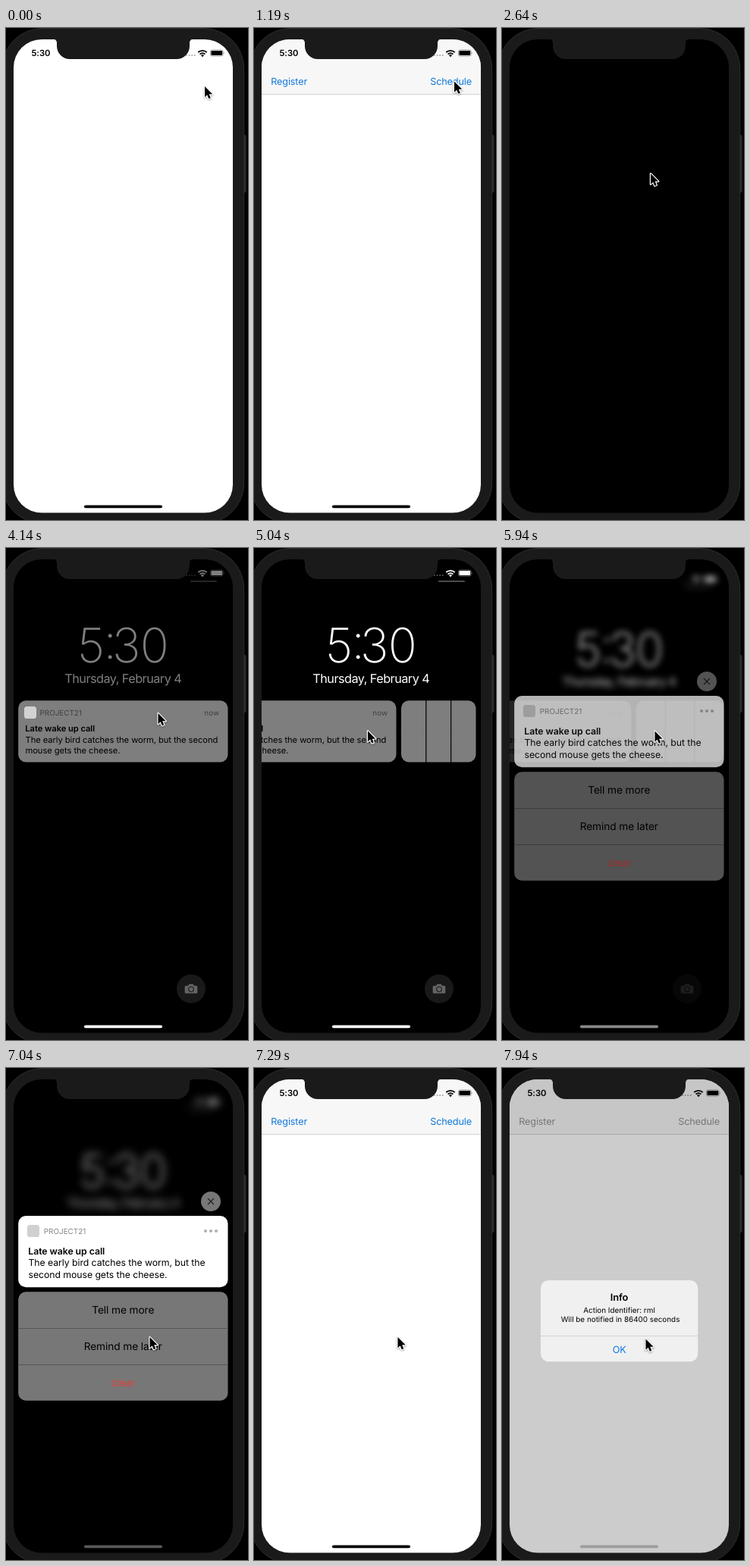
Recreate the animation shown at these times as an HTML page. Size 319 by 649 pixels, loop 7990 ms.

```html
<!DOCTYPE html>
<html lang="en">
<head>
<meta charset="utf-8">
<title>Notification actions</title>
<style>
  html, body { margin: 0; width: 100%; height: 100%; overflow: hidden; background: #000; }
  svg { display: block; width: 319px; height: 649px; }
  text { font-family: Inter, "Liberation Sans", sans-serif; letter-spacing: -.006em; text-rendering: geometricPrecision; }
  .mid { text-anchor: middle; }
  .end { text-anchor: end; }
  .bold { font-weight: 600; }
  .nav { font-size: 12.7px; letter-spacing: -.012em; }
  .small { font-size: 9.9px; letter-spacing: 0; }
  .short { font-size: 11.2px; }
  .long { font-size: 12.3px; }
  .row { font-size: 13.7px; }
  .cell { font-size: 11px; fill: #454545; }
  .clock { font-size: 63px; font-weight: 200; font-feature-settings: "calt" 0; }
  .date { font-size: 16.3px; letter-spacing: -.034em; }
  #cursor { filter: drop-shadow(0 1px 1px rgba(0, 0, 0, .35)); }
  #wall { transform-origin: 154px 324px; }
  #alert { transform-origin: 154.5px 334px; }
</style>
</head>
<body>
<svg viewBox="0 0 319 649">
  <defs>
    <clipPath id="screen"><rect x="10" y="15" width="289" height="624.5" rx="37"/></clipPath>
    <g id="icons">
      <path d="M253.3 32.2A8 8 0 0 1 264.7 32.2M255.6 34.6A4.8 4.8 0 0 1 262.4 34.6" fill="none" stroke="currentColor" stroke-width="1.8"/>
      <path d="M259 38.2L257 36A2.8 2.8 0 0 1 261 36Z" fill="currentColor"/>
      <rect x="269.4" y="28.9" width="16.8" height="8.2" rx="2.4" fill="none" stroke="currentColor" stroke-width=".8" opacity=".45"/>
      <rect x="270.4" y="29.9" width="14.8" height="6.2" rx="1.4" fill="currentColor"/>
      <path d="M287.2 31.5q1.3 1.5 0 3z" fill="currentColor" opacity=".5"/>
      <g fill="currentColor" opacity=".34">
        <circle cx="238" cy="36" r="1"/><circle cx="241.6" cy="36" r="1"/>
        <circle cx="245.2" cy="36" r="1"/><circle cx="248.8" cy="36" r="1"/>
      </g>
    </g>
  </defs>

  <rect x="312" y="141" width="4.6" height="76" rx="1.5" fill="#2b2b2b"/>
  <rect x="-5" y=".5" width="318.7" height="653" rx="53" fill="#1a1a1a" stroke="#2d2d2d"/>

  <g clip-path="url(#screen)">
    <rect x="9" y="14" width="291" height="627"/>

    <g id="lock">
      <g id="wall" fill="#fff" color="#fff">
        <use href="#icons"/>
        <rect x="243" y="43" width="35" height="1.8" rx=".9" opacity=".34"/>
        <text class="clock mid" x="112 137 158.5 195.5" y="151 145.5 151 151">5:30</text>
        <text class="date mid" x="154.3" y="177.6">Thursday, February 4</text>
      </g>
      <g id="camera">
        <circle cx="244" cy="581.5" r="19" fill="#191919"/>
        <path d="M237 577.5h3l1.5-2.3h5l1.5 2.3h3q1.3 0 1.3 1.3v7.4q0 1.3-1.3 1.3h-14q-1.3 0-1.3-1.3v-7.4q0-1.3 1.3-1.3z" fill="#646464"/>
        <circle cx="244" cy="582" r="3.3" fill="#646464" stroke="#191919" stroke-width="1.1"/>
      </g>

      <g id="brief">
        <g id="card">
          <rect x="16.2" y="201.2" width="276.3" height="81.3" rx="10" fill="#7e7e7e"/>
          <rect x="24" y="209" width="16" height="16" rx="3.6" fill="#d2d2d2"/>
          <text class="small" x="44.5" y="220.6" fill="#414141">PROJECT21</text>
          <text class="small end" x="281" y="220.6" fill="#414141">now</text>
          <text class="short bold" x="25.3" y="242">Late wake up call</text>
          <text class="short" x="25.5" y="256.7">The early bird catches the worm, but the second</text>
          <text class="short" x="25.5" y="270.7">mouse gets the cheese.</text>
        </g>
        <g id="swipe">
          <rect id="strip" y="201.2" height="81.3" rx="10" fill="#7e7e7e"/>
          <path id="seams" stroke="#000" stroke-width="1.2"/>
          <text class="cell mid" y="246.3">Manage</text>
          <text class="cell mid" y="246.3">View</text>
          <text class="cell mid" y="246.3">Clear</text>
        </g>
      </g>

      <g id="detail">
        <circle cx="270" cy="176" r="13" fill="#777"/>
        <path d="M266 172l8 8m0-8l-8 8" stroke="#222" stroke-width="1.2"/>
        <rect x="16.2" y="195" width="276.3" height="94.2" rx="10" fill="#fff"/>
        <rect x="28" y="207" width="16" height="16" rx="3.6" fill="#d0d0d0"/>
        <text class="small" x="49.8" y="218.7" fill="#858585">PROJECT21</text>
        <g fill="#b0b0b0">
          <circle cx="263" cy="215" r="2.1"/><circle cx="270" cy="215" r="2.1"/><circle cx="277" cy="215" r="2.1"/>
        </g>
        <text class="long bold" x="29.3" y="245.6">Late wake up call</text>
        <text class="long" x="29.5" y="261.3">The early bird catches the worm, but the</text>
        <text class="long" x="29.5" y="276.5">second mouse gets the cheese.</text>
        <rect x="16.2" y="295.2" width="276.3" height="143.5" rx="10" fill="#777"/>
        <path d="M16.2 343.5h276.3m0 48h-276.3" stroke="#555"/>
        <text class="row mid" x="154.3" y="324.3">Tell me more</text>
        <text class="row mid" x="154.3" y="372">Remind me later</text>
        <text class="row mid" x="154.3" y="420" fill="#e2403a">clear</text>
      </g>
    </g>

    <g id="app">
      <rect x="9" y="14" width="291" height="627" fill="#fff"/>
      <g id="bar">
        <rect x="9" y="14" width="291" height="73" fill="#f7f7f7"/>
        <path d="M9 87.5h291" stroke="#d2d2d2"/>
        <g id="tint">
          <text class="nav" x="22.2" y="75.3">Register</text>
          <text id="press" class="nav end" x="287" y="75.3">Schedule</text>
        </g>
      </g>
      <rect id="shade" x="9" y="14" width="291" height="627"/>
      <text class="bold" x="33.5" y="37" font-size="11.3">5:30</text>
      <use href="#icons" color="#000"/>
      <g id="alert">
        <rect x="51" y="280" width="207.3" height="107.3" rx="10.5" fill="#f0f0f0"/>
        <path d="M51 353.5h207.3" stroke="#d3d3d3"/>
        <text class="bold mid" x="154.5" y="307.3" font-size="12.9">Info</text>
        <text class="small mid" x="154.5" y="323">Action Identifier: rml</text>
        <text class="small mid" x="156" y="335">Will be notified in 86400 seconds</text>
        <text class="nav mid" x="154.7" y="375.5" fill="#1179de">OK</text>
      </g>
    </g>
    <rect id="home" x="103" y="629.4" width="103" height="3.8" rx="1.9"/>
  </g>

  <path d="M62 14.5a5 5 0 0 1 5 5v4.5a17 17 0 0 0 17 17h141a17 17 0 0 0 17-17v-4.5a5 5 0 0 1 5-5z" fill="#1a1a1a"/>
  <path id="cursor" d="M0 0V14.2L3.2 11.2 5.3 16.2 7.8 15.2 5.7 10.3H10.2Z" stroke="#fff" stroke-width="2.4" paint-order="stroke" stroke-linejoin="round"/>
</svg>

<script>
const LOOP = 7990, STEP = 50, START = 40;
const $ = id => document.getElementById(id);
const [lock, wall, camera, brief, card, swipe, strip, seams, detail, app, bar, tint, press, shade, alertBox, home, cursor] =
  ['lock', 'wall', 'camera', 'brief', 'card', 'swipe', 'strip', 'seams', 'detail', 'app', 'bar', 'tint', 'press',
   'shade', 'alert', 'home', 'cursor'].map($);
const cells = [...swipe.querySelectorAll('text')];

// time, x, y of the pointer tip
const pointer = [
  [40, 262, 77], [590, 264, 70.5], [1840, 264, 70.5], [2040, 196, 189],
  [2140, 196, 189], [2190, 196, 189.4], [2390, 196, 189.4], [2440, 196, 190],
  [2590, 196, 190], [2640, 196, 192], [3440, 196, 192], [3590, 200.5, 218.5],
  [3690, 200.5, 218.5], [3740, 200.5, 218], [4540, 200.5, 218], [4740, 220, 238],
  [5190, 115, 243], [5590, 201.5, 241.5], [6190, 201.5, 241.5], [6890, 189.5, 355],
  [7890, 189.5, 355], [7940, 189.5, 357.5]
];
// time, horizontal offset of the notification
const slide = [[4690, 0], [4940, -65], [5190, -165], [5340, -208], [5590, -214], [5790, -214], [6140, 0]];

const ramp = (t, a, b) => Math.min(1, Math.max(0, (t - a) / (b - a)));
const out = p => 1 - (1 - p) ** 3;
const lerp = (a, b, p) => a + (b - a) * p;

function track(keys, t) {
  const i = keys.findIndex(k => k[0] > t);
  if (i < 0) return keys[keys.length - 1].slice(1);
  if (i === 0) return keys[0].slice(1);
  const a = keys[i - 1], b = keys[i], p = ramp(t, a[0], b[0]);
  return a.slice(1).map((v, j) => lerp(v, b[j + 1], p));
}

const mix = (a, b, p) => `rgb(${a.map((v, i) => Math.round(lerp(v, b[i], p)))})`;
const show = (el, opacity) => {
  el.style.opacity = opacity;
  el.style.display = opacity > 0 ? '' : 'none';
};

function drawLock(t, open) {
  show(lock, t >= 4140 && t < 7290 ? 1 : 0);
  show(wall, t < 4340 ? .5 : lerp(1, .75, open));
  wall.style.filter = open ? `blur(${6 * open}px)` : 'none';
  wall.style.transform = `scale(${lerp(1, .96, open)})`;
  show(camera, 1 - open);
  show(brief, 1 - open);
  show(detail, open);

  const [dx] = track(slide, t);
  card.setAttribute('transform', `translate(${dx})`);
  const width = Math.max(0, -dx - 6.5), left = 292.5 - width, third = width / 3;
  show(swipe, width ? 1 : 0);
  strip.setAttribute('x', left);
  strip.setAttribute('width', width);
  seams.setAttribute('d', [1, 2].map(i => `M${left + i * third} 201v83`).join(''));
  cells.forEach((cell, i) => {
    cell.setAttribute('x', left + (i + .5) * third);
    cell.style.opacity = ramp(third, 32, 66);
  });
}

function drawApp(t) {
  const modal = out(ramp(t, 7390, 7740));
  show(app, t < 1540 || t >= 7290 ? 1 : t >= 7140 ? .5 : 0);
  show(bar, ramp(t, -10, 190));
  tint.style.fill = mix([17, 121, 222], [147, 147, 147], modal);
  press.style.opacity = t >= 890 && t < 1190 ? lerp(.25, 1, ramp(t, 890, 1190)) : 1;
  show(shade, .2 * modal);
  show(alertBox, modal);
  alertBox.style.transform = `scale(${lerp(1.15, 1, modal)})`;
}

function drawHome(t, open) {
  show(home, t >= 1540 && t < 4140 ? 0 : 1);
  const level = t >= 7940 ? 158 : t < 1540 || t >= 7140 ? 0 : lerp(255, 88, open);
  home.style.fill = `rgb(${level},${level},${level})`;
}

function render(time) {
  const t = Math.floor((time - START) / STEP) * STEP + START;
  const open = out(ramp(t, 5740, 6340));
  drawLock(t, open);
  drawApp(t);
  drawHome(t, open);
  cursor.setAttribute('transform', `translate(${track(pointer, t)})`);
}

const begin = performance.now();
function tick() {
  render((performance.now() - begin) % LOOP);
  requestAnimationFrame(tick);
}
tick();
</script>
</body>
</html>
```
